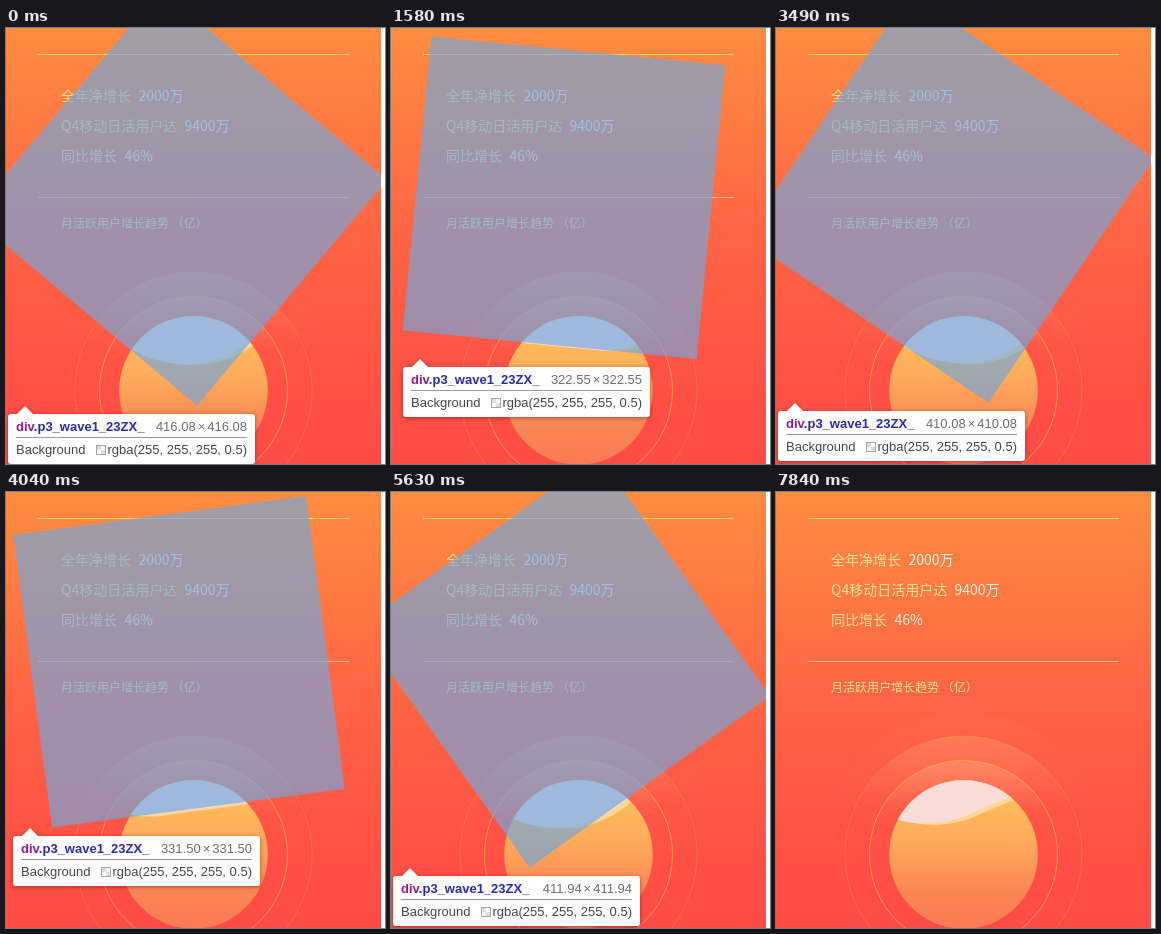
An HTML page for the animation above (7.94 s loop, 379 px wide and 436 px high).

```html
<!DOCTYPE html>
<html lang="zh">
<head>
<meta charset="utf-8">
<style>
  html, body { margin: 0; width: 100%; height: 100%; overflow: hidden; background: #fff; }
  svg { position: absolute; left: 0; top: 0; }
  .copy { font: 14px "Noto Sans CJK SC", "Noto Sans CJK", sans-serif; fill: #ffe08f; }
  .copy .num { fill: #fff3e2; }
  .copy .small { font-size: 12px; }

  .tip {
    position: absolute; left: 0; top: 0; box-sizing: border-box; padding: 4px 8px 5px;
    background: #fff; border-radius: 3px; color: #45454f;
    font: 13px "Liberation Sans", Arial, sans-serif; white-space: nowrap;
    filter: drop-shadow(0 1px 2px rgba(60, 0, 0, .45));
  }
  .tip::after {
    content: ""; position: absolute; left: 9px; width: 16px; height: 8px; background: #fff;
  }
  .tip.below::after { top: -8px; clip-path: polygon(50% 0, 100% 100%, 0 100%); }
  .tip.above::after { bottom: -8px; clip-path: polygon(0 0, 100% 0, 50% 100%); }
  .tip div { display: flex; justify-content: space-between; line-height: 19px; }
  .tip .head { line-height: 17px; height: 19px; border-bottom: 1px solid #999; margin-bottom: 2px; }
  .tip b { color: #2a2aae; }
  .tip b i { font-style: normal; color: #951a86; }
  .size { color: #6c6c74; }
  .size s { text-decoration: none; margin: 0 2px; }
  .swatch {
    display: inline-block; box-sizing: border-box; width: 10px; height: 10px;
    margin-right: 2px; border: 1px solid #a5a5a5; vertical-align: -1px;
  }
  .checker { background: conic-gradient(#fff 25%, #ddd 0 50%, #fff 0 75%, #ddd 0); }
  #waveTip { width: 247px; }
  #titleTip { width: 235px; left: 32px; top: 55px; }
</style>
</head>
<body>
<svg width="379" height="436">
  <defs>
    <linearGradient id="sky" x1="0" y1="0" x2="0" y2="1">
      <stop offset="0" stop-color="#ff8d40"/>
      <stop offset=".42" stop-color="#ff6844"/>
      <stop offset=".85" stop-color="#ff4f45"/>
      <stop offset="1" stop-color="#ff4b45"/>
    </linearGradient>
    <linearGradient id="sun" x1="0" y1="0" x2="0" y2="1">
      <stop offset="0" stop-color="#ffd05f"/>
      <stop offset=".2" stop-color="#ffb85a"/>
      <stop offset=".42" stop-color="#ffa95b"/>
      <stop offset=".75" stop-color="#fa8654"/>
      <stop offset="1" stop-color="#fa7a55"/>
    </linearGradient>
    <linearGradient id="halo" x1="0" y1="0" x2="0" y2="1">
      <stop offset="0" stop-color="#ffc890" stop-opacity=".3"/>
      <stop offset=".3" stop-color="#ffc890" stop-opacity="0"/>
    </linearGradient>
    <clipPath id="disc"><circle cx="187.5" cy="362.5" r="74.3"/></clipPath>
    <clipPath id="page"><rect width="375" height="436"/></clipPath>
  </defs>

  <g clip-path="url(#page)">
    <rect width="375" height="436" fill="url(#sky)"/>
    <path d="M32 26.5H343" stroke="#ffcf5c"/>
    <path d="M32 169.5H343" stroke="#ffb877"/>

    <g class="copy">
      <text x="55" y="73">全年净增长</text><text class="num" x="132.5" y="73">2000万</text>
      <text x="55" y="103">Q4移动日活用户达</text><text class="num" x="178.5" y="103">9400万</text>
      <text x="55" y="133">同比增长</text><text class="num" x="118.5" y="133">46%</text>
      <text class="small" x="55" y="200">月活跃用户增长趋势 （亿）</text>
    </g>

    <g fill="url(#halo)">
      <circle cx="187.5" cy="362.5" r="142" opacity=".15"/>
      <circle cx="187.5" cy="362.5" r="118.5" stroke="#ff9a4c" stroke-opacity=".45" opacity=".8"/>
      <circle cx="187.5" cy="362.5" r="94" stroke="#ffab48" stroke-opacity=".75"/>
    </g>
    <circle cx="187.5" cy="362.5" r="74.3" fill="url(#sun)"/>
    <g clip-path="url(#disc)">
      <rect class="wave" data-x="181" data-y="171.5" rx="103.4" fill="#fdd798"/>
      <rect class="wave" data-x="173.5" data-y="170.3" rx="103.4" fill="#fadcd9"/>
    </g>

    <rect id="waveBox" class="wave" data-x="173" data-y="169.8" fill="rgba(111,168,220,.66)"/>
    <g id="titleBox">
      <rect x="32" y="169.5" width="311.7" height="19.5" fill="rgba(246,178,107,.66)"/>
      <rect x="32" y="189" width="311.7" height="13" fill="rgba(111,168,220,.66)"/>
    </g>
  </g>
</svg>

<div id="waveTip" class="tip below">
  <div class="head"><b><i>div</i>.p3_wave1_23ZX_</b><span class="size"><span class="dim"></span><s>×</s><span class="dim"></span></span></div>
  <div><span>Background</span><span><span class="swatch checker"></span>rgba(255, 255, 255, 0.5)</span></div>
</div>

<div id="titleTip" class="tip above">
  <div class="head"><b><i>div</i>.top_charttitle_3EI6I</b><span class="size">311.72<s>×</s>13</span></div>
  <div><span>Color</span><span><span class="swatch" style="background:#fbcf92"></span>#FFE599</span></div>
  <div><span>Font</span><span>12px "Microsoft Yah…</span></div>
  <div><span>Margin</span><span>18.75px 0px 0px</span></div>
  <div><span>Padding</span><span>0px 0px 0px 23.4375px</span></div>
</div>

<script>
  const LOOP = 7940, SIDE = 295.3125, CX = 173, CY = 169.8;
  // [time in ms, counter-clockwise turn in degrees; 0 puts a corner straight down]
  const TURN = [[0, 4.86], [800, 67.8], [2420, 195.65], [3490, 280.84],
                [4600, 364.84], [5630, 440.45], [7840, 608]];
  const TITLE = [600, 1300], HOVER_END = 6120;

  const byId = id => document.getElementById(id);
  const waves = [...document.querySelectorAll('.wave')];
  const dims = document.querySelectorAll('.dim');
  const show = (id, on) => byId(id).style.visibility = on ? 'visible' : 'hidden';

  for (const w of waves) {
    w.setAttribute('x', w.dataset.x - SIDE / 2);
    w.setAttribute('y', w.dataset.y - SIDE / 2);
    w.setAttribute('width', SIDE);
    w.setAttribute('height', SIDE);
  }

  function turnAt(t) {
    for (let i = 1; i < TURN.length; i++) {
      const [t0, a0] = TURN[i - 1], [t1, a1] = TURN[i];
      if (t < t1) return a0 + (a1 - a0) * (t - t0) / (t1 - t0);
    }
    return TURN[TURN.length - 1][1];
  }

  function draw(t) {
    const turn = turnAt(t);
    for (const w of waves) {
      w.setAttribute('transform', `rotate(${45 - turn} ${w.dataset.x} ${w.dataset.y})`);
    }

    const onTitle = t >= TITLE[0] && t < TITLE[1];
    const onWave = !onTitle && t < HOVER_END;
    show('titleBox', onTitle);
    show('titleTip', onTitle);
    show('waveBox', onWave);
    show('waveTip', onWave);

    // Bounding box of the turned square drives the label and its place.
    const lean = (turn + 45) % 90 - 45;
    const size = SIDE * Math.SQRT2 * Math.cos(lean * Math.PI / 180);
    const tip = byId('waveTip').style;
    tip.left = Math.max(2, Math.round(CX - size / 2)) + 'px';
    tip.top = Math.round(CY + size / 2 + 8) + 'px';
    for (const d of dims) d.textContent = size.toFixed(2);
  }

  const start = performance.now();
  function tick() {
    draw((performance.now() - start) % LOOP);
    requestAnimationFrame(tick);
  }
  tick();
</script>
</body>
</html>
```
